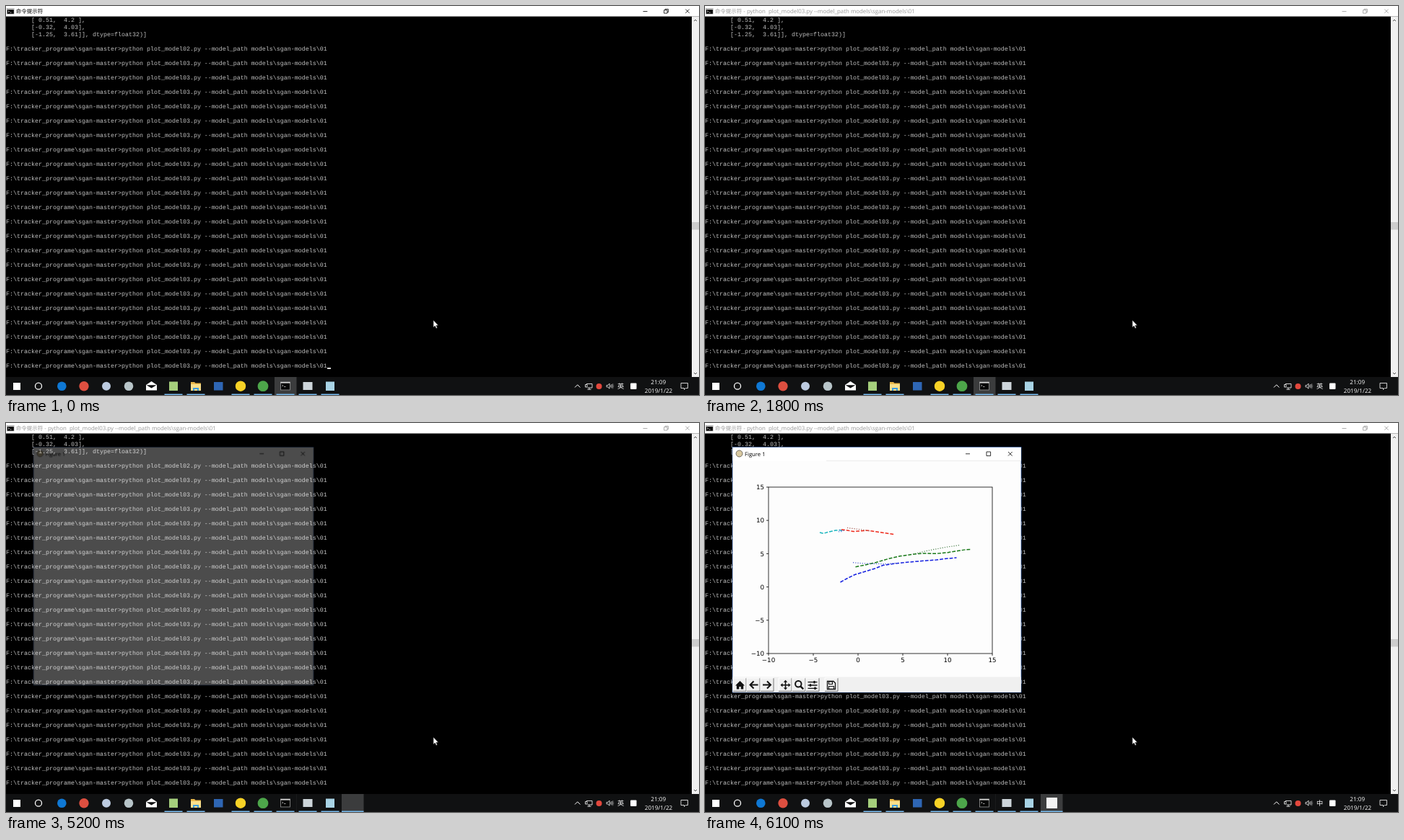
An HTML page for the animation above (6200 ms loop, 960 by 540 pixels).

```html
<!DOCTYPE html>
<html lang="zh-CN">
<head>
<meta charset="utf-8">
<title>Terminal</title>
<style>
  html, body { margin: 0; width: 100%; height: 100%; overflow: hidden; background: #000; }
  body { position: relative; text-rendering: geometricPrecision; }
  #log {
    position: absolute; left: 0; top: 15px; margin: 0; color: #c0c0c0;
    font: 8.333px/10px "Liberation Mono", monospace;
  }
  svg { position: absolute; left: 0; top: 0; display: block; }
  text { white-space: pre; }
  .ui { font-family: "Open Sans", sans-serif; }
  .cjk { font-family: "Noto Sans CJK SC", "Noto Sans CJK", sans-serif; }
  .line { fill: none; stroke: currentColor; stroke-width: .8; }
  #axes { font: 8.7px "DejaVu Sans", sans-serif; }
  .dash { fill: none; stroke-width: 1.5; stroke-dasharray: 4.8 2; }
  .dot { fill: none; stroke-width: 1.2; stroke-dasharray: 1.2 2; }

  #bar, .run, .idle, .opened, #win, .ready, .before {
    animation: 6200ms step-end infinite;
  }
  #bar { animation-name: blur; }
  .idle { animation-name: idle; }
  .run { animation-name: run; }
  .opened { animation-name: opened; }
  #win { animation-name: open; transform-origin: 38px 37px; }
  .ready { animation-name: ready; }
  .before { animation-name: before; }

  @keyframes blur { 0% { color: #000; } 9.6% { color: #999; } 100% { color: #999; } }
  @keyframes idle { 0% { opacity: 1; } 3.15% { opacity: 0; } 100% { opacity: 0; } }
  @keyframes run { 0% { opacity: 0; } 3.15% { opacity: 1; } 100% { opacity: 1; } }
  @keyframes opened { 0% { opacity: 0; } 83.8% { opacity: 1; } 100% { opacity: 1; } }
  @keyframes open {
    0% { opacity: 0; transform: scale(.97); }
    83.8% { opacity: .3; transform: scale(.97); }
    85.4% { opacity: .82; transform: scale(.9925); }
    87% { opacity: 1; transform: none; }
    100% { opacity: 1; transform: none; }
  }
  @keyframes ready { 0% { opacity: 0; } 91.85% { opacity: 1; } 100% { opacity: 1; } }
  @keyframes before { 0% { opacity: 1; } 91.85% { opacity: 0; } 100% { opacity: 0; } }
</style>
</head>
<body>
<pre id="log"></pre>
<svg width="960" height="540" viewBox="0 0 960 540">
  <rect class="idle" x="445" y="502" width="5" height="2" fill="#d8d8d8"/>

  <!-- title bar -->
  <rect width="960" height="14.5" fill="#fff"/>
  <g id="bar">
    <rect x="1.5" y="3.5" width="9.5" height="7.5" fill="#000" stroke="#8a8a8a" stroke-width=".6"/>
    <rect x="1.5" y="3.5" width="9.5" height="1.6" fill="#d5d5d5"/>
    <path d="M3 6.5l1.5 1-1.5 1M5.5 9h2" fill="none" stroke="#fff" stroke-width=".7"/>
    <text class="cjk" x="13.8" y="10" font-size="7.5" fill="currentColor">命令提示符</text>
    <text class="ui run" x="51.3" y="10" font-size="7.9" fill="currentColor"> - python  plot_model03.py --model_path models\sgan-models\01</text>
    <path class="line" d="M882.5 7.5h6M911.6 5.7h4.4v4.4h-4.4zM913 5.7v-1.4h4.4v4.4h-1.4M941.3 4.5l5.4 5.4M946.7 4.5l-5.4 5.4"/>
  </g>

  <!-- scroll bar -->
  <rect x="950" y="14.5" width="10" height="500.5" fill="#f0f0f0"/>
  <rect x="950" y="300" width="10" height="10.5" fill="#cdcdcd"/>
  <path d="M953 21l2-2 2 2M953 509l2 2 2-2" fill="none" stroke="#505050"/>

  <!-- taskbar -->
  <rect y="515" width="960" height="25" fill="#101112"/>
  <rect x="372" y="515" width="30.5" height="25" fill="#3b3c3d" id="focus"/>
  <g class="opened">
    <rect x="372" y="515" width="30.5" height="25" fill="#101112"/>
    <rect x="465" y="515" width="30.5" height="25" fill="#3b3c3d"/>
  </g>
  <g id="running" fill="#76b9ed"></g>
  <rect class="opened" x="465" y="538.5" width="30.5" height="1.5" fill="#76b9ed"/>
  <rect class="ready" x="473" y="520" width="15" height="15" fill="#f4f4f4"/>

  <rect x="10" y="523" width="10" height="10" fill="#fff"/>
  <circle cx="45" cy="527.7" r="4.5" fill="none" stroke="#fff" stroke-width="1.3"/>
  <circle cx="77.3" cy="527.7" r="6.3" fill="#0f78d4"/>
  <circle cx="108" cy="527.7" r="6.7" fill="#dd4f40"/>
  <circle cx="139" cy="527.7" r="6" fill="#bccbe0"/>
  <circle cx="170" cy="527.7" r="6.3" fill="#b8c5c9"/>
  <path d="M194 526l7.5-5 7.5 5v7.5h-15z" fill="#fff"/>
  <path d="M194.5 526.2h14l-7 4.3z" fill="#101112"/>
  <rect x="226" y="521.5" width="12" height="12.5" fill="#a5cf7c"/>
  <path d="M256 522h5l1.5 1.5h7.5v10.500h-14z" fill="#e9b84a"/>
  <path d="M256 525h14v9h-14z" fill="#fbe08c"/>
  <path d="M259 534v-4h8v4h-2v-2h-4v2z" fill="#3f9fe0"/>
  <rect x="288" y="522" width="12.500" height="11.500" fill="#2e66b4"/>
  <circle cx="325" cy="527.7" r="7.2" fill="#f7d226"/>
  <circle cx="356" cy="527.7" r="7.4" fill="#4da64a"/>
  <rect x="380.500" y="522" width="13" height="11" fill="#050505" stroke="#999" stroke-width=".8"/>
  <path d="M380.500 522.800h13" stroke="#d5d5d5" stroke-width="1.6"/>
  <path d="M382.500 526l1.500 1-1.500 1M385 528.500h2.500" fill="none" stroke="#ddd" stroke-width=".7"/>
  <rect x="411.500" y="522" width="13" height="11" fill="#cdd5da"/>
  <rect x="443" y="521.500" width="12" height="12.500" fill="#a8d3e5"/>

  <!-- tray -->
  <g color="#fff">
    <path class="line" d="M788 529.500l3.700-3.700 3.700 3.700" style="stroke-width:1"/>
    <path class="line" d="M804 524.500h8v5.500h-6.500M808 530v2M805.500 532.300h5M802.500 525.500v3.500h2.500v-3.500z"/>
    <circle cx="821.500" cy="528" r="4" fill="#e2483d"/>
    <path class="line" d="M832 526.500h1.700l2.300-2.300v7l-2.300-2.300h-1.700zM837.500 526.200q1 1.500 0 3M839 525q2 2.700 0 5.400"/>
    <path class="line" d="M840.500 524q2.500 3.700 0 7.400" opacity=".45"/>
    <g class="cjk" font-size="9.2" fill="#fff" text-anchor="middle">
      <text class="before" x="851.700" y="531.200">英</text>
      <text class="ready" x="851.700" y="531.200">中</text>
    </g>
    <rect x="865" y="523.500" width="8.500" height="8.500" rx="1" fill="#fff"/>
    <g class="ui" font-size="8.100" fill="#fff" text-anchor="middle">
      <text x="903.700" y="524.800">21:09</text>
      <text x="904" y="536.600">2019/1/22</text>
    </g>
    <path class="line" d="M935 523.500h9.500v7h-3l-2 2v-2h-4.500z"/>
  </g>

  <!-- figure window -->
  <g id="win">
    <rect x="38" y="33.500" width="400" height="340.500" fill="#fdfdfd" stroke="#2f5fae" stroke-width=".7"/>
    <rect x="38.400" y="33.900" width="399.200" height="18.600" fill="#fff"/>
    <circle cx="47.500" cy="42.500" r="4.500" fill="#d9c9a0" stroke="#55504a" stroke-width=".8"/>
    <text class="ui" x="55" y="45.500" font-size="7.700">Figure 1</text>
    <path class="line" d="M361 42.800h6M390 40h5.600v5.600h-5.600zM420 40l5.600 5.600M425.600 40l-5.600 5.600"/>

    <g class="ready">
      <path d="M168 52.500h269.500" stroke="#e8e8e8" stroke-width=".8"/>
      <rect x="38.400" y="352.500" width="399.200" height="21.100" fill="#f0f0f0"/>
      <g id="axes"><rect class="line" x="88" y="89" width="310" height="231"/></g>

      <g stroke="#18b5bd">
        <path class="dash" d="M159 152l5 1.300 8-2.300 9-2 7-.300 4 1"/>
      </g>
      <path class="dot" stroke="#3a62d8" d="M185 150.800l4-.200 3-1.500-6-.700" />
      <g stroke="#ee2a1c">
        <path class="dash" d="M189 148l8 .900 8 1.700 9-.700 11-.700 11 1.500 14 2.100 13 2"/>
        <path class="dot" stroke="#a3584f" d="M197 145.500l8 1 12 1.500 12 2"/>
      </g>
      <g stroke="#187818">
        <path class="dash" d="M208.500 199.700L222 197l15-3.500 17-5 16-3.700 20-2.800 12-1 18 .300 15-1.300 15-2.500 11-1.700 8-.300"/>
        <path class="dot" stroke="#4c804c" d="M288 182l14-3.300 16-3.400 18-3.300 16-2.300"/>
      </g>
      <g stroke="#1520e0">
        <path class="dash" d="M187.500 221l9-5 11-5.500 14-4.200 14-4.300 11-4.500 14-2 20-2.200 20-1.800 20-1.500 14-1.700 14-1.300"/>
        <path class="dot" stroke="#4056cf" d="M205 193.700l14 1.200 16 .500 15 .200 18-1.200"/>
      </g>

      <g id="tools"></g>
      <g fill="none" stroke="#111" stroke-width="2">
        <path d="M48.500 358l6.500 6.500h-1.800v5h-3.500v-3.500h-2.400v3.500h-3.500v-5H42z" fill="#111" stroke="none"/>
        <path d="M73.500 363.500h-10M67.500 358.500l-5 5 5 5"/>
        <path d="M80 363.500h10M86 358.500l5 5-5 5"/>
        <path d="M111.500 358.500v10.500M106 363.700h11" stroke-width="1.600"/>
        <path d="M111.500 356.800l2.700 3h-5.400zM111.500 370.600l2.700-3h-5.400zM104.500 363.700l3-2.700v5.400zM118.500 363.700l-3-2.700v5.400z" fill="#111" stroke="none"/>
        <circle cx="129.300" cy="362.300" r="4.200"/>
        <path d="M132.500 365.700l3.700 3.700" stroke-width="2.400"/>
        <path d="M142.500 359.700h13M142.500 364h13M142.500 368.300h13" stroke-width="1.300"/>
        <path d="M151.500 358v3.400M146 362.300v3.400M152.500 366.600v3.400" stroke-width="2.200"/>
        <path d="M169.500 358.500h8.500l2.500 2.500v8.500h-11z" stroke-width="1.300"/>
        <path d="M171.500 359h5v3.500h-5zM171.500 365.500h7v4h-7z" stroke-width="1.100"/>
      </g>
    </g>
  </g>

  <!-- pointer -->
  <path d="M592 436v10.200l2.300-2.100 1.500 3.500 1.700-.700-1.500-3.400h3z" fill="#fff" stroke="#000" stroke-width=".5"/>
</svg>
<script>
  const byId = id => document.getElementById(id);
  const add = (parent, tag, attrs, text = '') => {
    const el = document.createElementNS('http://www.w3.org/2000/svg', tag);
    for (const key in attrs) el.setAttribute(key, attrs[key]);
    el.textContent = text;
    parent.append(el);
  };

  // terminal lines
  const pad = ' '.repeat(7);
  const command = n => `\nF:\\tracker_programe\\sgan-master>python plot_model0${n}.py --model_path models\\sgan-models\\01`;
  byId('log').textContent = [
    pad + '[ 0.51,  4.2 ],',
    pad + '[-0.32,  4.03],',
    pad + '[-1.25,  3.61]], dtype=float32)]',
    command(2),
    ...Array(22).fill(command(3))
  ].join('\n');

  // running applications
  for (const x of [232, 263, 325, 356, 387, 418, 449])
    add(byId('running'), 'rect', { x: x - 12.5, y: 538.5, width: 25, height: 1.5 });

  // axis ticks
  const axes = byId('axes');
  for (let v = -10; v <= 15; v += 5) {
    const x = 88 + (v + 10) * 12.4;
    const y = 320 - (v + 10) * 9.24;
    const label = String(v).replace('-', '\u2212');
    add(axes, 'path', { class: 'line', d: `M${x} 320v3M88 ${y}h-3` });
    add(axes, 'text', { x, y: 332.4, 'text-anchor': 'middle' }, label);
    add(axes, 'text', { x: 82, y: y + 3.2, 'text-anchor': 'end' }, label);
  }

  // raised tool buttons
  for (const x of [39, 58, 77, 102, 121, 140, 166]) {
    add(byId('tools'), 'path', { d: `M${x} 372v-18h18`, fill: 'none', stroke: '#fff' });
    add(byId('tools'), 'path', { d: `M${x} 372.300h18v-18`, fill: 'none', stroke: '#777' });
  }
</script>
</body>
</html>
```
